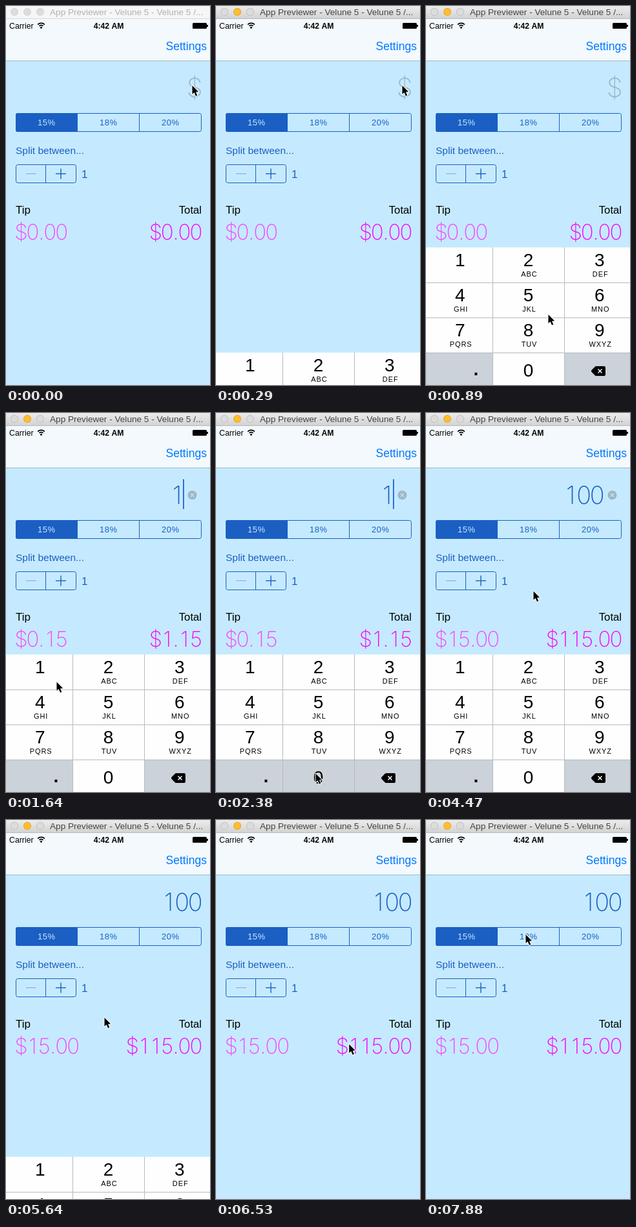
Recreate the animation shown at these times as an HTML page with a canvas. Size 316 by 584 pixels, loop 8 s.

```html
<!DOCTYPE html>
<html lang="en">
<head>
<meta charset="utf-8">
<title>Tip calculator</title>
<style>
html, body { margin: 0; width: 100%; height: 100%; overflow: hidden; background: #c5eaff; }
canvas { display: block; width: 316px; height: 584px; }
</style>
</head>
<body>
<canvas id="stage" width="316" height="584"></canvas>
<script>
const ctx = document.getElementById('stage').getContext('2d');
const W = 316, H = 584, LOOP = 8000;
const SKY = '#c5eaff', BLUE = '#1b5fc3', GREY = '#cbd2d9', LINE = '#b6bbc0';
const SANS = '"Liberation Sans", Arial, sans-serif';
const THIN = 'Inter, "Helvetica Neue", sans-serif';

const FIRST = 140, STEP = 148.6;
const ACTIVE = 140, SHOW = 250, HIDE = 5500, PRESS = 148;
const taps = [['1', 1470], ['0', 2360], ['0', 2660]];

// Pointer stops: step, x, y
const path = [
  [-1, 289, 122], [2, 289, 122], [5, 190, 475], [6, 150, 440], [8, 79, 414],
  [12, 79, 414], [13, 95, 450], [15, 155, 555], [17, 155, 555], [20, 176, 153],
  [24, 71, 184], [26, 71, 184], [29, 167, 274], [32, 52, 352], [34, 76, 336],
  [35, 153, 304], [38, 153, 304], [41, 60, 345], [44, 258, 345], [46, 240, 352],
  [51, 131, 264], [52, 155, 176]
];

const clamp = v => Math.max(0, Math.min(1, v));
const easeOut = p => 1 - (1 - clamp(p)) ** 3;
const smooth = p => p * p * (3 - 2 * p);

function rect(x, y, w, h, color) {
  ctx.fillStyle = color;
  ctx.fillRect(x, y, w, h);
}

function disc(x, y, r, color) {
  ctx.fillStyle = color;
  ctx.beginPath();
  ctx.arc(x, y, r, 0, 7);
  ctx.fill();
}

function line(x1, y1, x2, y2, color, width = 1) {
  ctx.strokeStyle = color;
  ctx.lineWidth = width;
  ctx.beginPath();
  ctx.moveTo(x1, y1);
  ctx.lineTo(x2, y2);
  ctx.stroke();
}

function cross(x, y, r, color, width) {
  line(x - r, y - r, x + r, y + r, color, width);
  line(x - r, y + r, x + r, y - r, color, width);
}

function box(x, y, w, h, r, color) {
  ctx.strokeStyle = color;
  ctx.lineWidth = 1;
  ctx.beginPath();
  ctx.roundRect(x, y, w, h, r);
  ctx.stroke();
}

function text(str, x, y, size, color, align = 'left', { weight = 400, spacing = 0 } = {}) {
  ctx.font = `${weight} ${size}px ${SANS}`;
  ctx.letterSpacing = spacing + 'px';
  ctx.fillStyle = color;
  ctx.textAlign = align;
  ctx.fillText(str, x, y);
  ctx.letterSpacing = '0px';
}

// Thin figures set on a tabular grid
function figures(str, x, y, size, color, align = 'left') {
  const advance = c => size * (c === '.' ? 0.27 : 0.544);
  const chars = [...str];
  if (align === 'right') x -= chars.reduce((sum, c) => sum + advance(c), 0);
  ctx.font = `160 ${size}px ${THIN}`;
  ctx.fillStyle = color;
  ctx.textAlign = 'center';
  for (const c of chars) {
    ctx.fillText(c, x + advance(c) / 2, y);
    x += advance(c);
  }
}

function titleBar(active) {
  if (active) {
    const g = ctx.createLinearGradient(0, 0, 0, 19);
    g.addColorStop(0, '#ececec');
    g.addColorStop(1, '#d3d3d3');
    rect(0, 0, W, 20, g);
  } else {
    rect(0, 0, W, 20, '#f6f6f6');
  }
  rect(0, 19, W, 1, active ? '#b9b9b9' : '#d9d9d9');
  [13, 33, 53].forEach((x, i) => {
    const lit = active && i === 1;
    disc(x, 9, 6, lit ? '#dfa023' : active ? '#bababa' : '#d2d2d2');
    disc(x, 9, 5.2, lit ? '#ffbd2e' : '#dcdcdc');
  });
  text('App Previewer - Velune 5 - Velune 5 /...', 68, 14, 13.6, active ? '#444' : '#b2b2b2');
}

function navBar() {
  rect(0, 20, W, 64, '#f3f9fc');
  rect(0, 84, W, 1, '#a3bac6');
  text('Carrier', 5, 35, 12.3, '#000');
  text('4:42 AM', 159, 35, 12.2, '#000', 'center', { weight: 700 });
  disc(54.5, 33.3, 1.5, '#000');
  ctx.strokeStyle = '#000';
  ctx.lineWidth = 1.6;
  for (const r of [4.4, 7.6]) {
    ctx.beginPath();
    ctx.arc(54.5, 34, r, -Math.PI * 0.75, -Math.PI * 0.25);
    ctx.stroke();
  }
  ctx.fillStyle = '#000';
  ctx.beginPath();
  ctx.roundRect(289, 26, 22, 9, 1.5);
  ctx.fill();
  rect(311, 29, 2, 3, '#000');
  text('Settings', 311, 68, 17.6, '#007aff', 'right');
}

function controls() {
  ctx.fillStyle = BLUE;
  ctx.beginPath();
  ctx.roundRect(15, 165, 96, 29, [3, 0, 0, 3]);
  ctx.fill();
  box(15.5, 165.5, 287, 28, 3, BLUE);
  line(206.5, 166, 206.5, 193, BLUE);
  ['15%', '18%', '20%'].forEach((s, i) =>
    text(s, 62.8 + 96 * i, 184, 13, i ? BLUE : SKY, 'center', { spacing: 0.6 }));

  text('Split between...', 15, 228, 15.5, BLUE);
  box(15.5, 244.5, 93, 28, 3, BLUE);
  line(61.5, 245, 61.5, 272, BLUE);
  line(31, 258.5, 47, 258.5, '#7aaae2');
  line(77, 258.5, 93, 258.5, BLUE, 1.4);
  line(85, 250.5, 85, 266.5, BLUE, 1.4);
  text('1', 117, 265, 17, BLUE);
}

function caretAlpha(t) {
  if (t < taps[0][1] + PRESS || t >= HIDE) return 0;
  if (t < 3080) return 1;
  const p = ((t - 3080) / 1010) % 1;
  return p < 0.56 ? clamp(1 - p / 0.07) : 1;
}

function amountField(typed, t) {
  const editing = typed && t < HIDE;
  if (typed) figures(typed, editing ? 275.5 : 303.5, 139.5, 37.8, BLUE, 'right');
  else figures('$', 303, 140, 40, '#9cb7c5', 'right');
  if (editing) {
    disc(288.5, 126.5, 7, '#9fb7c5');
    cross(288.5, 126.5, 2.6, SKY, 1.3);
  }
  ctx.globalAlpha = caretAlpha(t);
  rect(274, 102, 2, 46, '#2f6de0');
  ctx.globalAlpha = 1;
}

function results(typed) {
  const bill = Number(typed), tip = bill * 0.15;
  const money = v => '$' + v.toFixed(2);
  text('Tip', 15, 320, 17, '#000');
  text('Total', 303, 320, 16.7, '#000', 'right');
  figures(money(tip), 14.5, 359.5, 33, '#f74bfa');
  figures(money(bill + tip), 303.5, 359.5, 33, '#f70af7', 'right');
}

function backspace(x, y) {
  ctx.fillStyle = ctx.strokeStyle = '#000';
  ctx.lineWidth = 4;
  ctx.lineJoin = 'round';
  ctx.beginPath();
  ctx.moveTo(x - 9, y);
  ctx.lineTo(x - 3.5, y - 5.5);
  ctx.lineTo(x + 9, y - 5.5);
  ctx.lineTo(x + 9, y + 5.5);
  ctx.lineTo(x - 3.5, y + 5.5);
  ctx.closePath();
  ctx.fill();
  ctx.stroke();
  cross(x + 2.5, y, 3, '#fff', 1.5);
}

function keyboard(top, pressed) {
  if (top >= H) return;
  const edges = [0, 104, 215, W], centers = [52.7, 158.5, 268.7];
  const letters = ['', 'ABC', 'DEF', 'GHI', 'JKL', 'MNO', 'PQRS', 'TUV', 'WXYZ'];
  ctx.save();
  ctx.translate(0, top);
  rect(0, 0, W, 212, '#fefefe');
  rect(0, 163, 103, 49, GREY);
  rect(215, 163, 101, 49, GREY);

  for (let i = 0; i < 9; i++) {
    const col = i % 3, y = Math.floor(i / 3) * 54, label = String(i + 1);
    if (label === pressed) rect(edges[col], y, edges[col + 1] - edges[col], 54, GREY);
    text(label, centers[col], y + 29, 28, '#000', 'center');
    text(letters[i], centers[col] + 1.5, y + 44.5, 11, '#000', 'center', { spacing: 0.9 });
  }
  if (pressed === '0') rect(104, 163, 110, 49, GREY);
  text('0', centers[1], 198.5, 28, '#000', 'center');
  text('.', 77.5, 197, 28, '#000', 'center', { weight: 700 });
  backspace(267, 190.5);

  for (const y of [54, 108, 162]) rect(0, y, W, 1, LINE);
  for (const x of [103, 214]) rect(x, 0, 1, 212, LINE);
  ctx.restore();
}

function pointer(step) {
  let i = 1;
  while (i < path.length - 1 && path[i][0] < step) i++;
  const [s0, x0, y0] = path[i - 1], [s1, x1, y1] = path[i];
  const p = smooth(clamp((step - s0) / (s1 - s0)));
  ctx.save();
  ctx.translate(x0 + (x1 - x0) * p - 1, y0 + (y1 - y0) * p);
  ctx.beginPath();
  ctx.moveTo(0.5, 0.5);
  ctx.lineTo(0.5, 14);
  ctx.lineTo(3.6, 11.2);
  ctx.lineTo(6, 16.8);
  ctx.lineTo(8.3, 15.8);
  ctx.lineTo(6, 10.4);
  ctx.lineTo(10.2, 10.2);
  ctx.closePath();
  ctx.lineJoin = 'round';
  ctx.lineWidth = 2;
  ctx.strokeStyle = '#fff';
  ctx.stroke();
  ctx.fillStyle = '#000';
  ctx.fill();
  ctx.restore();
}

function draw(time) {
  const step = Math.max(-1, Math.floor((time - FIRST) / STEP));
  const t = step < 0 ? 0 : FIRST + step * STEP;
  const typed = taps.filter(tap => t >= tap[1] + PRESS).map(tap => tap[0]).join('');
  const press = taps.find(tap => t >= tap[1] && t < tap[1] + PRESS);
  const raised = easeOut((t - SHOW) / 450) - easeOut((t - HIDE) / 425);

  rect(0, 0, W, H, SKY);
  titleBar(t >= ACTIVE);
  navBar();
  amountField(typed, t);
  controls();
  results(typed);
  keyboard(Math.round(H - 212 * raised), press && press[0]);
  pointer(step);
}

const start = performance.now();
function tick() {
  draw((performance.now() - start) % LOOP);
  requestAnimationFrame(tick);
}
tick();
</script>
</body>
</html>
```
